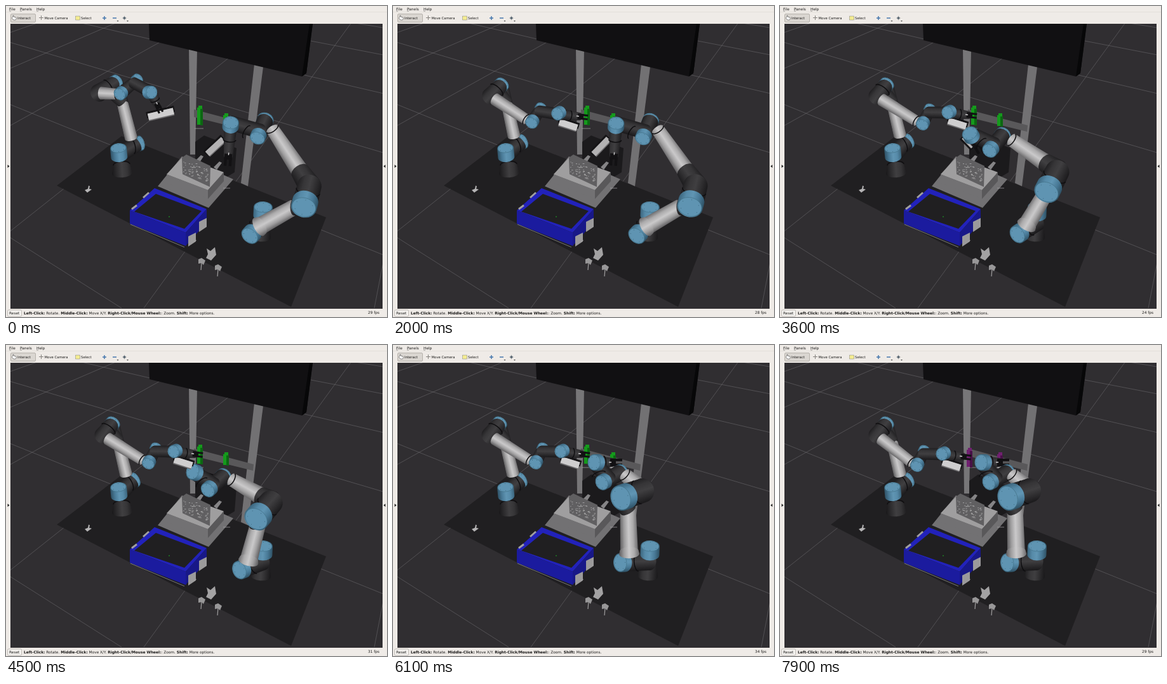
An HTML page with a canvas for the animation above (8000 ms loop, 600 by 490 pixels).

```html
<!DOCTYPE html>
<html lang="en">
<head>
<meta charset="utf-8">
<title>Two-arm robot cell</title>
<style>
html, body { margin: 0; width: 600px; height: 490px; overflow: hidden; background: #efebe7; }
body > svg, canvas { position: absolute; left: 0; top: 0; width: 600px; height: 490px; }
text { font: 5.85px "DejaVu Sans", sans-serif; fill: #1c1b1a; }
.tool { font-size: 5.35px; }
.b { font-weight: bold; }
</style>
</head>
<body>
<svg viewBox="0 0 600 490">
  <rect width="600" height="490" fill="#efebe7"/>
  <path d="M0 9.5H600" stroke="#dfdbd6" stroke-width=".7"/>
  <path d="M5 8h3M22 8h3M48 8h3" stroke="#444" stroke-width=".5"/>
  <text x="5" y="7">File</text><text x="22" y="7">Panels</text><text x="48" y="7">Help</text>
  <rect x="7.5" y="12.5" width="39" height="13" rx="1.5" fill="#dad6d1" stroke="#aaa59f" stroke-width=".8"/>
  <path d="M11 17v-2h1v2l4 1v3l-1 1h-3l-3-3z" fill="#fff" stroke="#444" stroke-width=".6"/>
  <text class="tool" x="18" y="21">Interact</text>
  <path d="M52 18.500h7M55.500 15v7" stroke="#85827e" stroke-width="1"/>
  <text class="tool" x="60.500" y="21">Move Camera</text>
  <rect x="109.500" y="16" width="7" height="6" fill="#f4ec91" stroke="#777" stroke-width=".7" stroke-dasharray="1.2 .6"/>
  <text class="tool" x="118" y="21">Select</text>
  <path d="M152 19h6M155 16v6M168 19h6" stroke="#4577ad" stroke-width="1.500"/>
  <circle cx="186.500" cy="19" r="2" fill="#4c6272"/>
  <path d="M183 19h7M186.500 15.500v7" stroke="#777" stroke-width=".5"/>
  <path d="M174.500 23h3l-1.500 1.500zM190 23h3l-1.500 1.500z" fill="#333"/>
  <path d="M2.500 250v5l3-2.500zM597.500 250v5l-3-2.500z" fill="#222"/>
  <svg id="scene" x="7" y="28" width="586" height="449" viewBox="7 28 586 449"></svg>
  <rect x="2.500" y="479" width="22" height="10" rx="1.500" fill="#f5f3f0" stroke="#aaa59f" stroke-width=".7"/>
  <text x="5" y="486.300">Reset</text>
  <text x="28" y="485.700"><tspan class="b">Left-Click:</tspan> Rotate. <tspan class="b">Middle-Click:</tspan> Move X/Y. <tspan class="b">Right-Click/Mouse Wheel:</tspan>: Zoom. <tspan class="b">Shift:</tspan> More options.</text>
  <text id="fps" x="570" y="484.500">29 fps</text>
</svg>
<canvas id="view"></canvas>

<script>
const LOOP = 8000, STEP = 100;
const canvas = document.getElementById('view');
const ctx = canvas.getContext('2d');
const fps = document.getElementById('fps');
const ratio = window.devicePixelRatio || 1;
canvas.width = 600 * ratio;
canvas.height = 490 * ratio;

let seed = 7;
const random = () => (seed = seed * 16807 % 2147483647) / 2147483647;
const mix = (p, q, k) => [p[0] + (q[0] - p[0]) * k, p[1] + (q[1] - p[1]) * k];
const add = (p, x, y) => [p[0] + x, p[1] + y];
const clamp = x => Math.min(1, Math.max(0, x));

// ---- Still scene ----
const fill = (d, color) => `<path d="M${d}z" fill="${color}"/>`;
const line = (d, color, width) => `<path d="${d}" fill="none" stroke="${color}" stroke-width="${width}"/>`;

// Box seen from above: corners run left, back, right, front.
function prism([l, b, r, f], h, top, front, side) {
  const wall = (p, q, color) => fill([p, q, add(q, 0, h), add(p, 0, h)].join('L'), color);
  return fill([l, b, r, f].join('L'), top) + wall(l, f, front) + wall(f, r, side);
}

// Ground grid: two bundles of lines, each meeting at a vanishing point.
function gridPath() {
  let d = '';
  for (let k = -8; k < 12; k++) d += `M-904 -212L${182 + 620 * k} 476M712 -205L${217 + 363 * k} 476`;
  return d;
}

function speckPath() {
  let d = '';
  for (let i = 0; i < 60; i++) {
    const x = 279 + random() * 40;
    const y = 240 + (x - 279) * .43 + random() * 23;
    d += `M${x.toFixed(1)} ${y.toFixed(1)}h${(1 + random() * 2).toFixed(1)}`;
  }
  return d;
}

const part = (x, y) => fill(`${x - 5} ${y - 3}l5 -2 6 4 -3 7 -3 -3 -5 1`, '#989798') +
  line(`M${x} ${y + 2}l-1 12`, '#a09fa0', 1.2);
const handle = (x, y) => fill(`${x} ${y}l12 -6v14l-12 8`, '#9b9a9b');

document.getElementById('scene').innerHTML =
  '<rect width="600" height="490" fill="#302e31"/>' +
  line(gridPath(), '#69676b', .6) +
  fill('80 283L182 205 504 333 449 474', '#201f21') +
  fill('288 65l13 3 -3 166h-8', '#777678') +
  fill('391 92l14 4 -24 188 -11 -5', '#727173') +
  fill('296 163l94 25 -1 10 -93 -23', '#59585a') +
  fill('225 28L226 54 466 111 473 106 483 28', '#111012') +
  fill('466 111l7 -5 10 -78h-5', '#070708') +
  fill('298 214l14 -10 51 20 -3 38 -20 12 -42 -20', '#1b1a1c') +
  fill('239 284l38 -47 81 36 -39 45', '#727173') +
  fill('297 245l10 -10 4 2 -7 11', '#858486') +
  fill('327 254l9 -9 4 2 -8 11', '#858486') +
  prism([[253, 265], [278, 238], [343, 262], [318, 290]], 14, '#9f9e9f', '#727173', '#59585a') +
  fill('277 239l7 -5 38 18 -1 33 -43 -20', '#605f61') +
  line(speckPath(), '#cfcecf', .6) +
  prism([[195, 322], [234, 287], [316, 320], [283, 357]], 21, '#2222bb', '#1b1b9e', '#181888') +
  fill('202 324L236 296 308 323 281 351', '#201f21') +
  line('M196 344L281 380', '#777', 1) +
  handle(304, 340) + handle(287, 363) +
  line('M198 320l8 -6M216 302l9 -8', '#a09fa0', 3) +
  '<circle cx="257" cy="332" r=".9" fill="#1f8a25"/>' +
  fill('124 290l5 -2 1 -5 2 1 -1 4 4 1 -7 5', '#b5b4b5') +
  fill('316 382l6 4 7 -6 2 12 -8 9 -8 -4 3 -6', '#a3a2a3') +
  part(308, 402) + part(334, 412) +
  line('M342 287h11M297 193h14M296 371l4 -2', '#a9a8a9', .7);

// ---- Arms ----
// Joints in each pose: shoulder, elbow back, elbow front, wrist 1-3, tool tip.
const leftPoses = [
  [[212, 216], [175, 119], [146, 137], [179, 139], [208, 115], [229, 136], [239, 157]],
  [[214, 219], [188, 125], [156, 138], [181, 161], [214, 143], [228, 172], [268, 181]],
  [[204, 212], [169, 122], [153, 143], [224, 187], [237, 161], [264, 168], [298, 172]]
];
const rightPoses = [
  [[384, 362], [478, 283], [469, 317], [409, 178], [396, 208], [354, 184], [350, 237]],
  [[374, 360], [437, 260], [420, 293], [352, 202], [330, 228], [299, 201], [309, 218]],
  [[358, 343], [394, 229], [359, 241], [360, 200], [329, 217], [317, 185], [346, 185]]
];

// Smooth path through three poses; the middle one is reached at u = m.
function through([a, b, c], m, u) {
  const ka = (u - m) * (u - 1) / m;
  const kb = u * (u - 1) / (m * (m - 1));
  const kc = u * (u - m) / (1 - m);
  return a.map((p, j) => [0, 1].map(i => p[i] * ka + b[j][i] * kb + c[j][i] * kc));
}

const shades = {
  steel: ['#6b6a6c', '#acabac', '#cac9ca', '#9f9e9f', '#5c5b5d'],
  dark: ['#1f1e20', '#363537', '#403f41', '#2d2c2e', '#19181a'],
  blue: ['#3b657d', '#568aa8', '#6095b3', '#497a97', '#2f5266']
};

// Tapered, round-ended cylinder shaded across its width.
function tube(p, q, r0, r1, kind, flat = .45) {
  const a = Math.atan2(q[1] - p[1], q[0] - p[0]);
  const len = Math.hypot(q[0] - p[0], q[1] - p[1]);
  const r = Math.max(r0, r1) * (Math.cos(a) < 0 ? -1 : 1);
  const g = ctx.createLinearGradient(0, -r, 0, r);
  shades[kind].forEach((c, i) => g.addColorStop(i / 4, c));
  ctx.save();
  ctx.translate(p[0], p[1]);
  ctx.rotate(a);
  ctx.fillStyle = g;
  ctx.beginPath();
  ctx.ellipse(0, 0, r0 * flat, r0, 0, Math.PI / 2, Math.PI * 1.5);
  ctx.ellipse(len, 0, r1 * flat, r1, 0, -Math.PI / 2, Math.PI / 2);
  ctx.fill();
  ctx.restore();
}

function ring(p, q, k, r) {
  const c = mix(p, q, k);
  ctx.strokeStyle = '#0f0e10';
  ctx.lineWidth = 1.5;
  ctx.beginPath();
  ctx.ellipse(c[0], c[1], r * .4, r, Math.atan2(q[1] - p[1], q[0] - p[0]), -Math.PI / 2, Math.PI / 2);
  ctx.stroke();
}

// Blue joint cover facing away from q.
function cover(p, q, r, squash = .8, depth = .5) {
  const a = Math.atan2(p[1] - q[1], p[0] - q[0]);
  tube(add(p, -Math.cos(a) * r * depth, -Math.sin(a) * r * depth), p, r, r, 'blue', squash);
  ctx.save();
  ctx.translate(p[0], p[1]);
  ctx.rotate(a);
  ctx.fillStyle = '#5f94b2';
  ctx.strokeStyle = '#447389';
  ctx.lineWidth = .7;
  ctx.beginPath();
  ctx.ellipse(0, 0, r * squash * .92, r * .92, 0, 0, 7);
  ctx.fill();
  ctx.stroke();
  ctx.fillStyle = '#31586d';
  for (let b = 0; b < 6; b += Math.PI / 3) {
    ctx.fillRect(Math.cos(b) * r * squash * .72 - .4, Math.sin(b) * r * .72 - .4, .8, .8);
  }
  ctx.restore();
}

function block(x, y, h, held) {
  const [front, side] = held ? ['#702070', '#481248'] : ['#159a1c', '#0c6712'];
  ctx.fillStyle = front;
  ctx.fillRect(x - 4, y - h, 8, h * 2 - 3);
  ctx.fillRect(x - 2, y - h - 3, 6, 4);
  ctx.fillStyle = side;
  ctx.fillRect(x + 1, y - h + 2, 4, h * 2 - 4);
}

// Pale gripper body with a black mount behind it.
function plate([x, y], deg, len, h, color) {
  ctx.save();
  ctx.translate(x, y);
  ctx.rotate(deg * Math.PI / 180);
  ctx.fillStyle = '#151416';
  ctx.fillRect(-len / 2 - 2, -h / 2 - 3, len + 4, h * .8);
  ctx.fillStyle = '#6f6e70';
  ctx.fillRect(-len / 2, -h / 2, len, h);
  ctx.fillStyle = color;
  ctx.fillRect(-len / 2, -h / 2, len, h * .85);
  ctx.restore();
}

function jaws(from, tip, size) {
  ctx.save();
  ctx.translate(tip[0], tip[1]);
  ctx.rotate(Math.atan2(tip[1] - from[1], tip[0] - from[0]));
  ctx.fillStyle = '#121113';
  ctx.fillRect(-4, -size, 9, size * 2);
  for (const side of [-1, .3]) ctx.fillRect(3, size * side, size * 2, size * .7);
  ctx.fillStyle = '#d4d3d4';
  ctx.fillRect(-6, -1, 4, 1.4);
  ctx.restore();
}

function drawLeft([shoulder, back, elbow, w1, w2, w3, tip]) {
  const base = [177, 226];
  const root = add(shoulder, -15, -8);
  const bend = mix(back, elbow, .5);
  const tilt = Math.atan2(tip[1] - w3[1], tip[0] - w3[0]) * 180 / Math.PI;
  tube([182, 250], [183, 263], 13, 16, 'dark');
  ring([183, 262], [182, 250], 1, 13);
  cover(shoulder, base, 12, .5);
  tube([179, 234], mix(base, shoulder, .82), 13, 12, 'dark');
  ring(base, shoulder, .6, 13);
  cover([177, 224], [179, 245], 13, .6, 1.1);
  tube(root, back, 10, 9, 'dark');
  tube(root, mix(root, back, .6), 10, 9, 'steel');
  tube(mix(root, back, .65), bend, 10, 12, 'dark');
  cover(back, elbow, 12, .65);
  tube(elbow, mix(elbow, back, .75), 14, 12, 'dark', .9);
  ring(elbow, back, .5, 13);
  tube(mix(elbow, w1, .1), mix(elbow, w1, .87), 10, 8.5, 'steel');
  ring(w1, elbow, .13, 8.5);
  cover(w2, w1, 9.5, .7);
  tube(w1, mix(w1, w2, .7), 10, 9, 'dark', .8);
  tube(mix(w1, w2, .75), w3, 9, 9.5, 'dark', .8);
  cover(w1, mix(w1, w2, .5), 10.5);
  plate(add(tip, -22 + .42 * tilt, 14), 21 - .53 * tilt, 28 + .2 * tilt, 12, '#cfcecf');
  tube(w3, tip, 9.5, 6, 'dark');
  ring(w3, tip, .55, 7.5);
  cover(w3, mix(w2, tip, .5), 10.5, .88);
  jaws(w3, tip, 4.5);
}

function drawRight([shoulder, back, elbow, w1, w2, w3, tip], u) {
  const hub = [404, 340];
  const root = add(shoulder, 14, -14);
  const knee = mix(elbow, back, .3);
  const thigh = mix(root, knee, .75);
  const fore = mix(back, w1, .22), cuff = mix(back, w1, .85);
  tube([402, 350], [401, 364], 14, 16, 'dark');
  tube(hub, shoulder, 15, 14, 'dark', .7);
  cover([405, 317], hub, 15, .6, .9);
  ring(hub, shoulder, .4, 15);
  cover(shoulder, hub, 15, .72);
  plate(add(tip, -20 + 20 * u, -15 + 23 * u), -43 - 210 * u, 34 - 30 * u, 11, '#b3b2b3');
  tube(w3, tip, 11, 7, 'dark');
  ring(w3, tip, .5, 10);
  jaws(w3, tip, 6);
  cover(w1, w2, 13, .75);
  tube(mix(w1, w2, .1), mix(w1, w2, .8), 13, 12, 'dark', .8);
  tube(mix(w1, w2, .65), w3, 12, 11.5, 'dark', .7);
  ring(w2, w3, .4, 11);
  cover(w2, w1, 12.5, .78);
  cover(w3, tip, 13, .8);
  tube(cuff, fore, 10.5, 14, 'steel');
  ring(cuff, fore, 0, 10.5);
  tube(root, thigh, 14, 12.5, 'steel');
  tube(root, mix(root, thigh, .06), 16, 15, 'steel');
  tube(thigh, mix(thigh, elbow, .7), 13, 15, 'dark');
  tube(fore, back, 15, 18, 'dark', .6);
  tube(back, mix(back, elbow, .8), 19, 20, 'dark', .9);
  ring(back, elbow, .25, 19);
  cover(elbow, back, 20.5, .78);
}

const rates = [29, 37, 28, 24, 31, 45, 34, 29];

function draw(t) {
  const u = clamp((t - 1950) / 3800);
  const pull = clamp((t - 6400) / 1400);
  const left = through(leftPoses, .52, clamp(t / 2100))
    .map((p, i) => i > 2 ? add(p, -9 * pull, 4 * pull) : p);
  const held = t >= 6900;
  ctx.setTransform(ratio, 0, 0, ratio, 0, 0);
  ctx.clearRect(0, 0, 600, 490);
  block(305 - 7 * pull, 175 + 5 * pull, 15, held || (t >= 4600 && t < 5500));
  block(346, 182, 10, held);
  drawRight(through(rightPoses, .434, u), u);
  drawLeft(left);
  fps.textContent = rates[Math.floor(t / 1000)] + ' fps';
}

const start = performance.now();
function tick(now) {
  const t = Math.max(0, now - start) % LOOP;
  draw(Math.floor(t / STEP) * STEP);
  requestAnimationFrame(tick);
}
draw(0);
requestAnimationFrame(tick);
</script>
</body>
</html>
```
